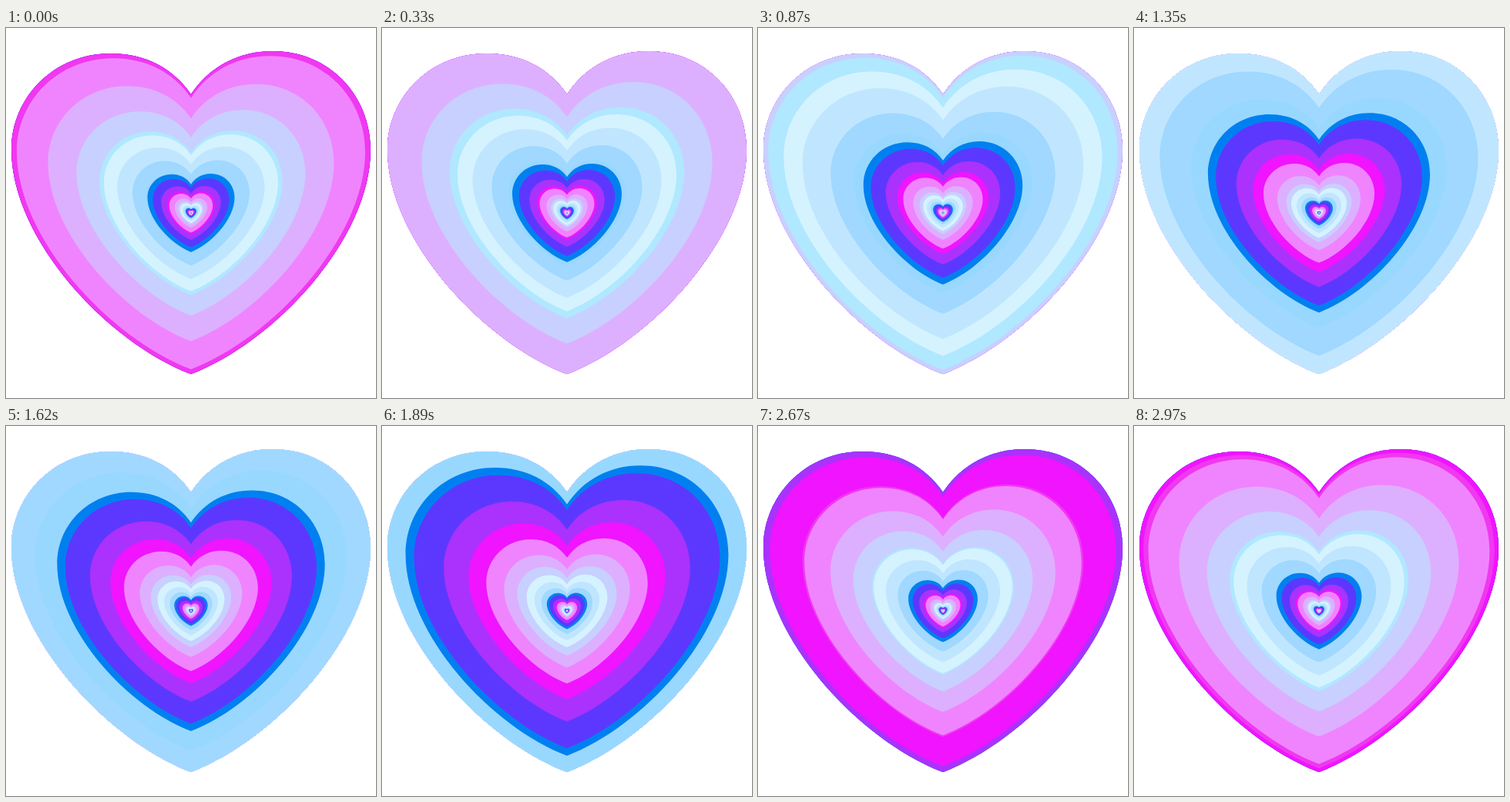
An HTML page with a canvas for the animation above (3000 ms loop, 480 by 480 pixels).

```html
<!DOCTYPE html>
<html lang="en">
<head>
<meta charset="utf-8">
<title>Endless hearts</title>
<style>
  html, body { margin: 0; width: 100%; height: 100%; overflow: hidden; background: #fff; }
  canvas { display: block; }
</style>
</head>
<body>
<canvas id="stage" width="480" height="480"></canvas>
<script>
const ctx = document.getElementById('stage').getContext('2d');
const LOOP = 3000, STEP = 30, HALF_WIDTH = 233, START = 56.5;

// Heart around (0, 0), as wide as the fixed outer silhouette
const heart = new Path2D(`M0-154
  C24-190 62-210 106-210 C180-210 233-152 233-82
  C233 34 108 168 0 209
  C-108 168 -233 34 -233-82
  C-233-150 -178-207 -104-207 C-60-207 -23-188 0-154Z`);

// Each group: a leading heart and the hearts trailing it: [colour, ratio, inset]
const groups = [
  [['#0080f0', 1, 0], ['#5c38ff', .987, 8.3], ['#aa32fc', .806, 9],
   ['#f014ff', .6455, 7.5], ['#f038f0', .546, 14]],
  [['#f084ff', 1, 0], ['#ddb0ff', .856, 8], ['#c8d0ff', .692, 8],
   ['#b0e8ff', .578, 12]],
  [['#d5f3ff', 1, 0], ['#c0e6ff', .926, 9], ['#a0d8ff', .7457, 8.3],
   ['#98d8ff', .617, 12]]
];

function fillHeart(color, radius) {
  const s = radius / HALF_WIDTH;
  ctx.save();
  ctx.scale(s, s);
  ctx.fillStyle = color;
  ctx.fill(heart);
  ctx.restore();
}

function draw(now) {
  const t = Math.floor(now % LOOP / STEP) * STEP / LOOP;
  ctx.clearRect(0, 0, 480, 480);
  ctx.save();
  ctx.translate(240, 240);
  ctx.clip(heart);
  // Every group is half the size of the one before; three groups make a loop
  for (let i = -3; i < 9; i++) {
    const lead = START * 2 ** (3 * t - i);
    for (const [color, ratio, inset] of groups[(i + 3) % 3])
      fillHeart(color, lead * ratio - inset * Math.min(1, lead / 75));
  }
  ctx.restore();
}

const start = performance.now();
function tick() {
  draw(performance.now() - start);
  requestAnimationFrame(tick);
}
tick();
</script>
</body>
</html>
```
